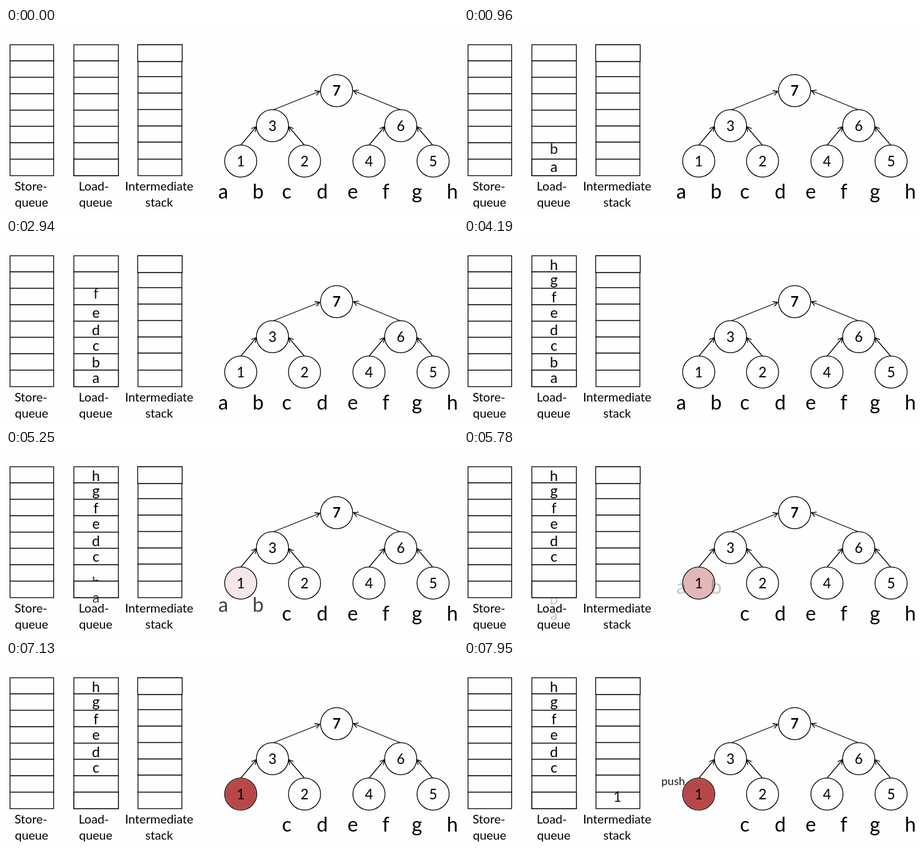
Write an HTML page that moves like this. It is 726 by 295 pixels and loops after 7990 ms.

```html
<!DOCTYPE html>
<html lang="en">
<head>
<meta charset="utf-8">
<title>Queues, stack and expression tree</title>
<style>
  html, body { margin: 0; width: 100%; height: 100%; overflow: hidden; background: #fefefe; }
  svg { display: block; width: 726px; height: 295px; }
  text { font-family: Lato, Roboto, sans-serif; text-anchor: middle; fill: #000; }
  .line { stroke: #000; stroke-width: 1.3; fill: none; }
  .box { fill: #fefefe; }
</style>
</head>
<body>
<svg id="stage" viewBox="0 0 726 295"></svg>
<script>
const LOOP = 7990;
const DRIFT = 54;          // distance of a floating entrance or exit
const ENTER = 500, EXIT = 1000, EXIT_AT = 5000;
const FILL = 2000, PUSH_AT = 7500;

const stage = document.getElementById('stage');
const movers = [];

function add(tag, attrs, content) {
  const el = document.createElementNS('http://www.w3.org/2000/svg', tag);
  for (const key in attrs) el.setAttribute(key, attrs[key]);
  if (content) el.textContent = content;
  return stage.appendChild(el);
}
const label = (content, x, y, size, weight = 400) =>
  add('text', { x, y, 'font-size': size, 'font-weight': weight }, content);
const box = (x, y, width, height) => add('rect', { x, y, width, height, class: 'line box' });
const line = d => add('path', { d, class: 'line' });

function arrow(x1, y1, x2, y2) {
  const angle = Math.atan2(y2 - y1, x2 - x1);
  const wing = turn =>
    `${x2 - 8.5 * Math.cos(angle + turn)} ${y2 - 8.5 * Math.sin(angle + turn)}`;
  line(`M${x1} ${y1}L${x2} ${y2}M${wing(0.5)}L${x2} ${y2}L${wing(-0.5)}`);
}

// Columns of cells
function column(x, width, rows) {
  for (let i = 0; i < rows.length - 1; i++) box(x, rows[i], width, rows[i + 1] - rows[i]);
}
const rows = [27, 53, 79.5, 106, 132.5, 158.5, 185, 211.5, 238];
column(6.5, 70, rows);
column(109, 71.5, rows);
column(212, 70.5, [27, 54, 78.5, 105, 131.5, 158, 184, 211.5, 238]);
box(211.5, 27, 71.5, 27);

label('Store-', 40, 262, 19.6);
label('queue', 41, 287.5, 19.6);
label('Load-', 141, 262, 19.6);
label('queue', 144, 287.5, 19.6);
label('Intermediate', 246, 262, 19.6);
label('stack', 246, 287.5, 19.6);

// Tree
arrow(429, 132, 504, 102);
arrow(634, 132, 558, 101);
for (const x of [428, 634]) {
  arrow(x - 51, 189, x - 26, 159);
  arrow(x + 51.5, 189, x + 26, 159);
}
let tint;
function node(name, x, y) {
  add('circle', { cx: x, cy: y, r: 25.8, class: 'line box' });
  if (name === '1') tint = add('circle', { cx: x, cy: y, r: 25.2, fill: '#b84848' });
  label(name, x, y + 8, 22.5, name === '7' ? 700 : 400);
}
node('7', 531, 101);
node('3', 428, 157.5);
node('6', 634, 157.5);
node('1', 377, 214.5);
node('2', 479.5, 214.5);
node('4', 583, 214.5);
node('5', 686, 214.5);

// Letters: the bottom cell covers all queue entries but the first
const letters = [...'abcdefgh'];
const leafX = [349, 405, 451, 508, 557, 610, 660, 717];
const queueY = [232, 207, 180, 155, 127, 102, 74, 50];

letters.forEach((name, i) => {
  const el = label(name, leafX[i], 274.5, 32);
  if (i < 2) movers.push({ el, exit: EXIT_AT, way: -1 });
});
for (let i = letters.length - 1; i >= 0; i--) {
  if (i === 0) box(109, 211.5, 71.5, 26.5);
  const el = label(letters[i], 144.5, queueY[i], 23);
  movers.push({ el, enter: i * ENTER, exit: i < 2 ? EXIT_AT : Infinity, way: 1 });
}
movers.push({ el: label('1', 246.5, 232, 23), enter: PUSH_AT });
movers.push({ el: label('push', 336, 205, 18), enter: PUSH_AT });

const progress = (time, start, length) =>
  Math.min(1, Math.max(0, (time - start) / length));

function draw(time) {
  for (const { el, enter = -ENTER, exit = Infinity, way = 1 } of movers) {
    const come = progress(time, enter, ENTER);
    const go = progress(time, exit, EXIT);
    el.setAttribute('transform', `translate(0 ${DRIFT * (come - 1 + way * go)})`);
    el.setAttribute('opacity', come * (1 - go));
  }
  tint.setAttribute('opacity', progress(time, EXIT_AT, FILL));
}

const begin = performance.now();
function tick() {
  draw((performance.now() - begin) % LOOP);
  requestAnimationFrame(tick);
}
tick();
</script>
</body>
</html>
```
